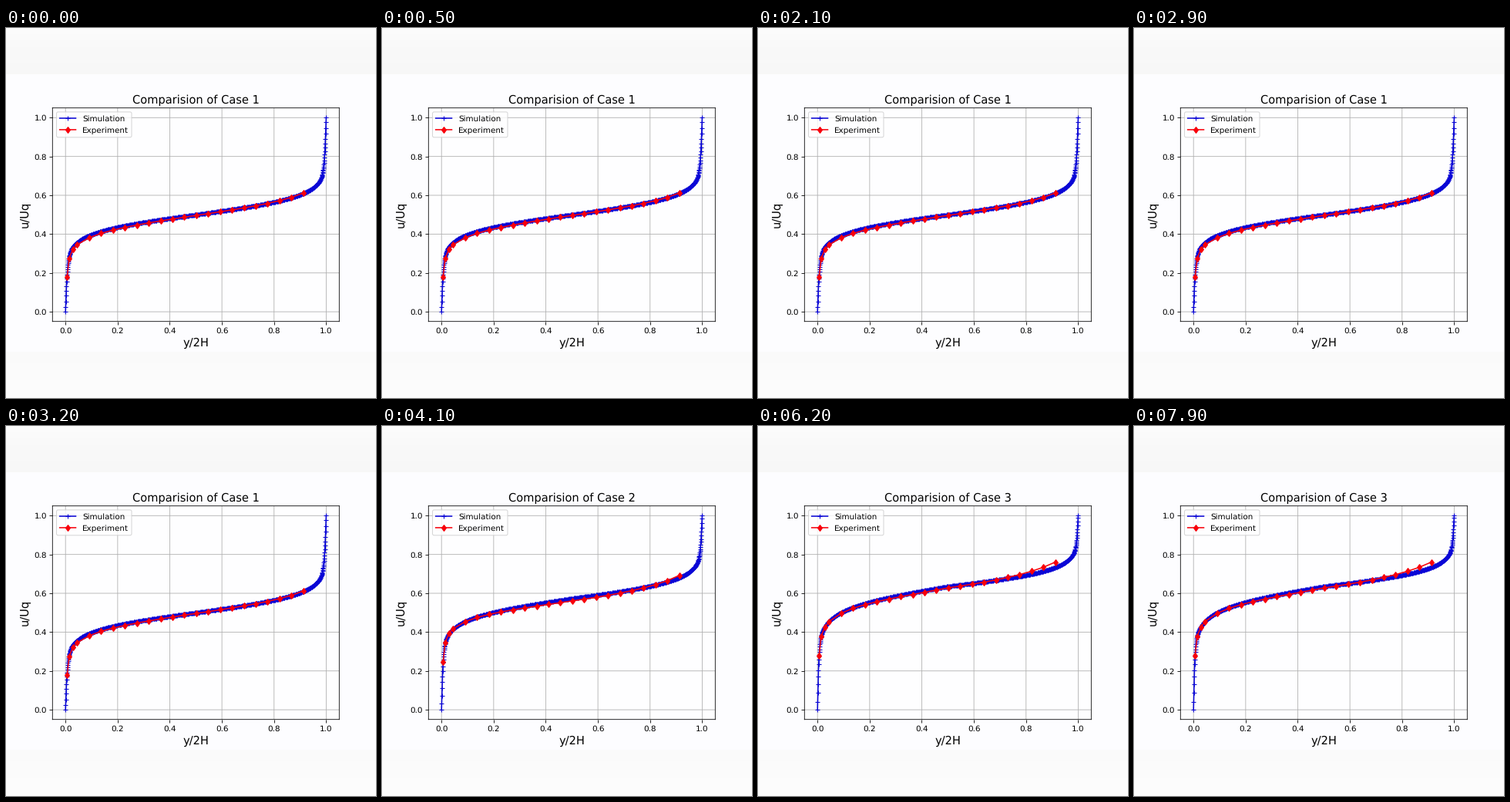
Write a matplotlib script that moves like this. It is 480 by 480 pixels and loops after 8 s.

```python
import numpy as np
import matplotlib.pyplot as plt
from matplotlib.animation import FuncAnimation

# Unhinted text and unsnapped lines keep sub-pixel sizes
plt.rcParams.update({"font.family": "DejaVu Sans",
                     "text.hinting": "no_hinting", "path.snap": False})

SIZE, DPI = 480, 75
FRAMES, STEP = 80, 100

# start (ms), centre velocity, log slopes at the two walls,
# sublayer thickness, drift of the measured points (1, y, y^3)
CASES = [
    (0, .500, .0468, .0468, .0046, (-.012, .016, 0)),
    (4100, .573, .0514, .0460, .0040, (.004, -.050, .070)),
    (6200, .635, .0585, .0420, .0034, (0, -.034, .077)),
]


def profile(y, mid, k_lo, k_hi, d):
    """Log law at both walls, damped inside the viscous sublayers."""
    y = np.clip(y, 1e-9, 1 - 1e-9)
    s = np.log(y / (1 - y))
    u = mid + np.where(y < .5, k_lo, k_hi) * s
    u = u * (1 - np.exp(-y / d))
    return 1 - (1 - u) * (1 - np.exp((y - 1) / d))


def measured(y, shape, drift):
    c, b, a = drift
    return profile(y, *shape) + c + b * y + a * y**3


# Mesh clustered at both walls
B = 1.2
mesh = .5 * (1 + np.tanh(B * np.linspace(-1, 1, 601)) / np.tanh(B))
probes = np.r_[.006, .014, .028, .045, np.linspace(.091, .912, 19)]

fig = plt.figure(figsize=(SIZE / DPI, SIZE / DPI), dpi=DPI)


def px_axes(left, top, right, bottom, **kw):
    return fig.add_axes([left / SIZE, 1 - bottom / SIZE,
                         (right - left) / SIZE, (bottom - top) / SIZE], **kw)


# Pale backdrop with the white plot panel
back = px_axes(0, 0, SIZE, SIZE)
back.axis("off")
rows = np.arange(SIZE)
shade = np.interp(rows, [0, 25, 59, 60, 419, 420, 479],
                  [.988, .976, .970, .995, .995, .982, .992])
image = np.repeat(shade[:, None, None], 3, axis=2)
image[(rows >= 60) & (rows < 420), :, 2] = 1
back.imshow(image, extent=(0, 1, 0, 1), aspect="auto")

ax = px_axes(60.3, 103.7, 432.3, 380.7, facecolor="#fefeff")
ax.set(xlim=(-.05, 1.05), ylim=(-.05, 1.05))
ax.set_xticks(np.arange(0, 1.1, .2))
ax.set_yticks(np.arange(0, 1.1, .2))
ax.grid(True)
sim, = ax.plot(mesh, mesh, "+-", color="#0a06d6", label="Simulation")
exp, = ax.plot(probes, probes, "d-", color="#f8000a", label="Experiment")
ax.set_xlabel("y/2H", fontsize=14)
ax.set_ylabel("u/Uq", fontsize=14)
title = ax.set_title("", fontsize=14)
ax.legend(loc="upper left")


def update(frame):
    number = sum(frame * STEP >= case[0] for case in CASES)
    _, *shape, drift = CASES[number - 1]
    sim.set_ydata(profile(mesh, *shape))
    exp.set_ydata(measured(probes, shape, drift))
    title.set_text(f"Comparision of Case {number}")
    return sim, exp, title


anim = FuncAnimation(fig, update, frames=FRAMES, interval=STEP,
                     repeat=True, repeat_delay=0)
plt.show()
```
